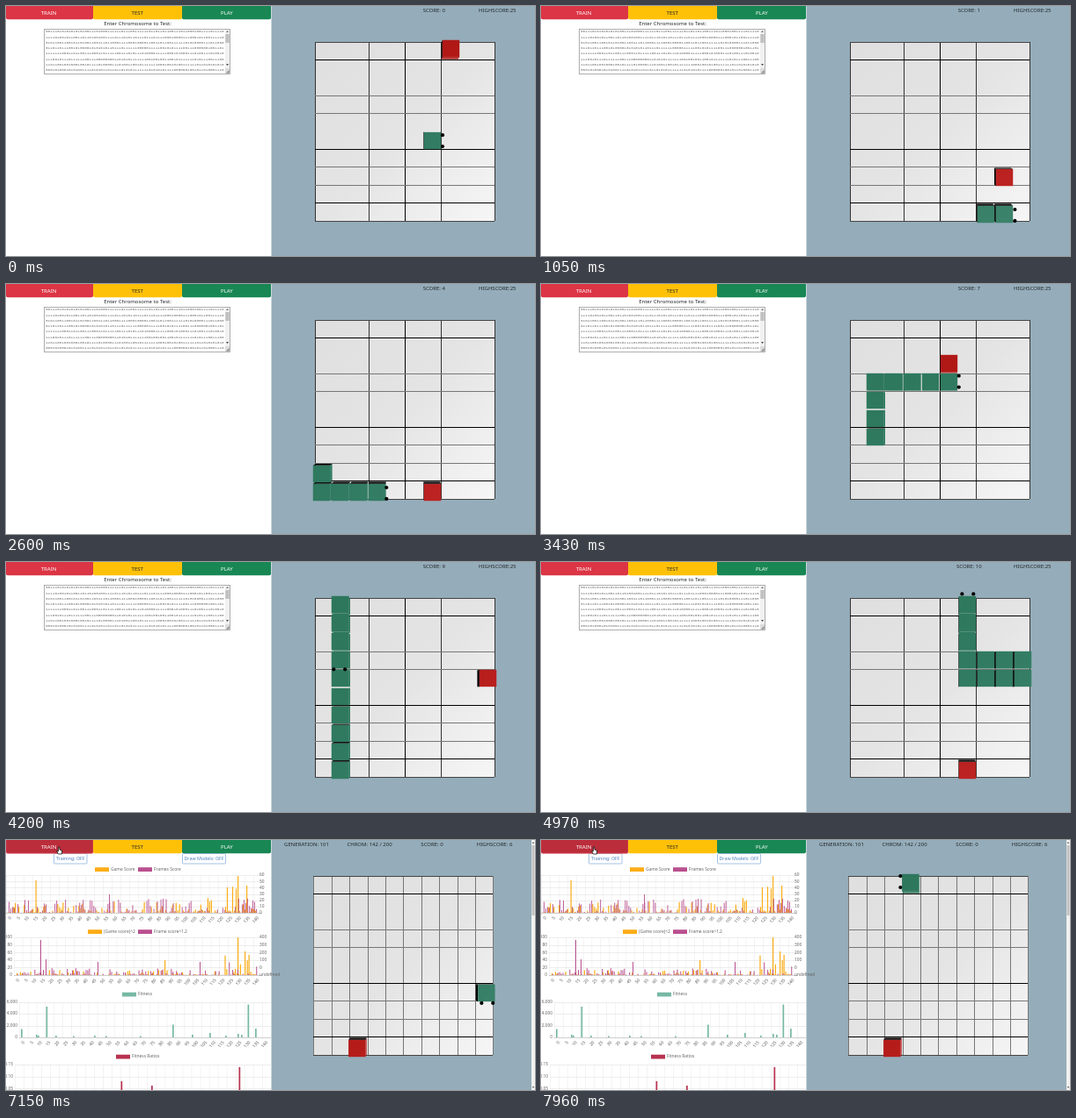
An HTML page with a canvas for the animation above (8 s loop, 601x285 px).

```html
<!DOCTYPE html>
<html lang="en">
<head>
<meta charset="utf-8">
<title>Snake trainer</title>
<style>
html, body { margin: 0; width: 100%; height: 100%; overflow: hidden; background: #fff; }
canvas { display: block; }
</style>
</head>
<body>
<canvas id="stage" width="601" height="285"></canvas>
<script>
const ctx = document.getElementById('stage').getContext('2d');
const LOOP = 8000, TICK = 69.82, SWITCH = 98;
const SANS = '"Noto Sans", "Open Sans", sans-serif', MONO = '"Liberation Mono", monospace';
const CELL = 20.4, MID = { x: 453, y: 143 };
const DIRS = { R: [1, 0], L: [-1, 0], U: [0, -1], D: [0, 1] };

function boardShade(...colors) {
  const g = ctx.createLinearGradient(351, 41, 555, 245);
  colors.forEach((c, i) => g.addColorStop(i / (colors.length - 1), c));
  return g;
}

const FLOOR = boardShade('#dfdfdf', '#e5e4e4', '#f6f6f6');
const GREEN = boardShade('#2d765b', '#2f7a60', '#3d846d');
const RED = boardShade('#ae1614', '#b11917', '#c12827');

function seeded(seed) {
  return () => {
    seed = (seed * 1664525 + 1013904223) >>> 0;
    return seed / 4294967296;
  };
}

function rect(x, y, w, h, color) {
  ctx.fillStyle = color;
  ctx.fillRect(x, y, w, h);
}

function shape(points, fill, stroke) {
  ctx.beginPath();
  points.forEach(([x, y], i) => i ? ctx.lineTo(x, y) : ctx.moveTo(x, y));
  ctx.closePath();
  ctx.fillStyle = fill;
  ctx.fill();
  if (stroke) {
    ctx.strokeStyle = stroke;
    ctx.lineWidth = 0.8;
    ctx.stroke();
  }
}

function label(str, x, y, color = '#212529', size = 6, align = 'center', family = SANS) {
  ctx.font = size + 'px ' + family;
  ctx.textAlign = align;
  ctx.textBaseline = 'middle';
  ctx.fillStyle = color;
  ctx.fillText(str, x, y);
}

// A game expands a route such as "R3U2" into head positions and meals.
function makeGame(route, foods) {
  const heads = [{ x: 6, y: 5, d: DIRS.R }];
  const meals = [];
  for (const [, dir, count] of route.matchAll(/([RLUD])(\d+)/g)) {
    for (let i = 0; i < +count; i++) {
      const last = heads[heads.length - 1], d = DIRS[dir];
      const head = { x: (last.x + d[0] + 10) % 10, y: (last.y + d[1] + 10) % 10, d };
      heads.push(head);
      const food = foods[meals.length];
      if (food && food[0] === head.x && food[1] === head.y) meals.push(heads.length - 1);
    }
  }
  return { heads, meals, foods };
}

const testGame = makeGame(
  'R1U5L3D9R5U3L1D1L1U7L7D9R11U6R4U1L4D12R8U1L3U5L6D1R9U9L6D6R4',
  [[7, 0], [8, 7], [7, 1], [0, 3], [6, 9], [1, 6], [3, 3], [5, 2],
   [1, 8], [9, 4], [6, 9], [2, 8], [9, 1], [3, 4], [8, 6]]);
const trainGame = makeGame('R2U1R1D5L2U9L4', [[2, 9]]);

// Pace of play: tick and number of moves made by then.
const PACE = [[0, 0], [15, 22], [37, 55], [49, 73], [71, 105], [86, 129], [98, 148]];

function movesAt(tick) {
  for (let i = 1; i < PACE.length; i++) {
    const [a, m] = PACE[i - 1], [b, n] = PACE[i];
    if (tick <= b) return Math.floor(m + (n - m) * (tick - a) / (b - a) + 0.01);
  }
  return 148;
}

// Seen from above: raised points move away from the middle of the board.
function raise(x, y, zoom) {
  return [MID.x + (x - MID.x) * zoom, MID.y + (y - MID.y) * zoom];
}

function cube(col, row, color, topPass) {
  const x = 351 + (col + 0.5) * CELL, y = 41 + (row + 0.5) * CELL, half = 9.4;
  const L = x - half, R = x + half, T = y - half, B = y + half;
  const [l, t] = raise(L, T, 1.03), [r, b] = raise(R, B, 1.03);
  if (topPass) return rect(l, t, r - l, b - t, color);
  if (b < B) shape([[L, B], [R, B], [r, b], [l, b]], color);
  if (r < R) shape([[R, T], [R, B], [r, b], [r, t]], color);
  if (l > L) shape([[L, T], [l, t], [l, b], [L, B]], '#000');
  if (t > T) shape([[L, T], [R, T], [r, t], [l, t]], '#000');
}

function drawBoard(training, shift) {
  const x0 = 351 + shift, size = CELL * 10;
  rect(x0, 41, size, size, FLOOR);
  const columns = training ? [0, 1, 2, 3, 4, 5, 6, 7, 8, 9, 10] : [0, 3, 5, 7, 10];
  for (const i of columns) {
    const color = training ? '#777' : i === 5 ? '#000' : '#333';
    rect(Math.round(x0 + i * CELL), 41, 1, size, color);
  }
  for (const i of [0, 1, 3, 4, 6, 7, 8, 9, 10]) {
    const color = [1, 6, 9].includes(i) ? '#000' : i % 10 ? '#777' : '#444';
    rect(Math.round(x0), Math.floor(41 + i * CELL), Math.round(size), 1, color);
  }
}

function drawGame(game, n, shift) {
  n = Math.min(n, game.heads.length - 1);
  const score = game.meals.filter(m => m <= n).length;
  const head = game.heads[n];
  const parts = game.heads.slice(Math.max(0, n - score), n + 1).map(p => [p.x, p.y, GREEN]);
  const food = game.foods[score];
  if (food) parts.push([...food, RED]);
  ctx.save();
  ctx.translate(shift, 0);
  for (const top of [false, true]) {
    for (const [x, y, color] of parts) cube(x, y, color, top);
  }
  const [dx, dy] = head.d;
  for (const side of [-6.2, 6.2]) {
    const ex = 351 + (head.x + 0.5) * CELL + dx * 10.7 + dy * side;
    const ey = 41 + (head.y + 0.5) * CELL + dy * 10.7 + dx * side;
    ctx.beginPath();
    ctx.arc(...raise(ex, ey, 1.04), 2.1, 0, Math.PI * 2);
    ctx.fillStyle = '#000';
    ctx.fill();
  }
  ctx.restore();
  return score;
}

function drawButtons(hover, focus) {
  const tabs = [['TRAIN', 0, 99, '#dc3545', '#fff', '#bb2d3b'],
                ['TEST', 99, 101, '#ffc107', '#212529', '#ffca2c'],
                ['PLAY', 200, 101, '#198754', '#fff', '#157347']];
  tabs.forEach(([name, x, w, color, ink, dark], i) => {
    ctx.beginPath();
    ctx.roundRect(x, -3, w, 18.2, 2);
    ctx.fillStyle = hover === i ? dark : color;
    ctx.fill();
    if (focus === i) {
      ctx.strokeStyle = 'rgba(225, 83, 97, 0.5)';
      ctx.lineWidth = 1.4;
      ctx.stroke();
    }
    label(name, x + w / 2 - 1 + i * 0.7, 8.3, ink, 6);
  });
}

const bitRandom = seeded(77);
const bitRows = Array.from({ length: 8 }, () =>
  Array.from({ length: 78 }, () => bitRandom() < 0.5 ? 0 : 1).join(''));

function drawTestPage() {
  label('Enter Chromosome to Test:', 149.5, 20.3);
  ctx.strokeStyle = '#999';
  ctx.lineWidth = 0.8;
  ctx.strokeRect(43.5, 26.5, 211, 51);
  ctx.save();
  ctx.beginPath();
  ctx.rect(44, 27, 210, 50);
  ctx.clip();
  bitRows.forEach((row, i) => label(row, 45, 29.2 + i * 6.28, '#6a6a6a', 4.33, 'left', MONO));
  rect(249, 27, 5, 50, '#f1f1f1');
  rect(249.3, 32, 4.4, 10, '#c1c1c1');
  shape([[250, 30], [253, 30], [251.5, 28]], '#777');
  shape([[250, 66], [253, 66], [251.5, 68]], '#444');
  rect(249, 71, 5, 6, '#dcdcdc');
  shape([[253.5, 73], [253.5, 76.5], [250, 76.5]], '#888');
  ctx.restore();
}

const ORANGE = '#fbad17', PURPLE = '#b9508f', TEAL = '#77b8a4', CRIMSON = '#b8324f';

function axes(x0, x1, top, bottom, left, right) {
  const rows = (left || right).length - 1;
  const h = bottom - top, step = (x1 - x0) / 29;
  for (let i = 0; i < 29; i++) {
    const x = x0 + i * step;
    rect(x, top, 0.6, h + 2, '#ececec');
    if (bottom > 285) continue;
    ctx.save();
    ctx.translate(x + 4, bottom + 6.5);
    ctx.rotate(-0.85);
    label(i * 5, 2, 0, '#555', 4.8, 'right');
    ctx.restore();
  }
  for (let i = 0; i <= rows; i++) {
    rect(x0, Math.round(top + h * i / rows), x1 - x0, 0.7, i === rows ? '#bbb' : '#e6e6e6');
    if (right) label(right[i], x1 - 3, top + h * i / rows, '#666', 4.8, 'left');
  }
  if (left) left.forEach((s, i) => label(s, x0 - 2, top + h * i / (left.length - 1), '#666', 4.8, 'right'));
}

function legend(x, y, color, text) {
  rect(x, y - 2.3, 16, 4.8, color);
  label(text, x + 18, y, '#666', 4.9, 'left');
}

function bars(base, color, list, w) {
  for (const [x, h] of list) rect(x, base - h, w, h, color);
}

// Sparse noisy series of [x, height]; level(u) bounds the height at u in 0..1.
function noise(seed, x0, x1, level) {
  const rnd = seeded(seed);
  return Array.from({ length: 142 }, (_, i) =>
    [x0 + (x1 - x0) * i / 145, level(i / 142) * Math.pow(rnd(), 3.2)]);
}

const gameBars = noise(11, 0, 291, u => u > 0.8 ? 38 : u < 0.16 ? 19 : 13).concat([[33.5, 37], [263, 42], [273, 31]]);
const frameBars = noise(29, 1, 292, u => u > 0.8 ? 20 : 17).concat([[117, 21], [178, 16]]);
const squareBars = noise(5, 10, 291, u => u > 0.86 ? 28 : 6).concat([[180, 17], [263, 43], [271, 27]]);
const powerBars = noise(47, 11, 292, u => u > 0.86 ? 18 : 8).concat([[39, 40], [45, 18], [104, 15], [220, 15]]);
const fitBars = [[17, 9.5], [34, 3], [36, 2], [45.5, 35], [56, 2], [76, 1.5], [100, 2], [113, 1.5],
  [152, 1.5], [189, 14.5], [211, 3], [231, 5], [249, 2], [263, 4], [267, 3], [274.5, 37.5], [283, 10]];

function drawTrainPage() {
  for (const [text, x, w] of [['Training: OFF', 54.5, 37.5], ['Draw Models: OFF', 200.5, 49]]) {
    ctx.strokeStyle = '#7fa9dc';
    ctx.lineWidth = 0.7;
    ctx.beginPath();
    ctx.roundRect(x, 15.5, w, 11.5, 1);
    ctx.stroke();
    label(text, x + w / 2, 21.5, '#4d7fbd', 5.3);
  }
  legend(101, 33.5, ORANGE, 'Game Score');
  legend(150, 33.5, PURPLE, 'Frames Score');
  axes(0, 291, 40, 83, null, [60, 50, 40, 30, 20, 10, 0]);
  bars(83, ORANGE, gameBars, 1.2);
  bars(83, PURPLE, frameBars, 0.9);

  legend(93, 104.5, ORANGE, '(Game score)^2');
  legend(150, 104.5, PURPLE, 'Frame score^1.2');
  axes(9, 291, 111, 154, ['100', '80', '60', '40', '20', '0'], [400, 300, 200, 100, 0]);
  bars(154, ORANGE, squareBars, 1.2);
  bars(154, PURPLE, powerBars, 1);

  legend(132, 176, TEAL, 'Fitness');
  axes(15, 301, 184.5, 225, ['6,000', '4,000', '2,000', '0'], null);
  bars(225, TEAL, fitBars, 1.7);

  legend(125, 247, CRIMSON, 'Fitness Ratios');
  axes(10, 301, 256, 297, ['0.15', '0.10', '0.05', '0'], null);
  bars(297, CRIMSON, [[130.5, 22], [165, 17], [264.5, 38]], 1.7);
}

function drawCursor(tick) {
  if (tick < 85) return;
  const u = Math.min(1, Math.max(0, (tick - 86) / 11));
  const s = u * u * (3 - 2 * u);
  const x = 531.5 + (60 - 531.5) * s, y = 277 + (8 - 277) * s;
  const at = pts => pts.map(([a, b]) => [x + a, y + b]);
  if (y < 15) {
    shape(at([[-0.6, 0], [0.8, 0], [0.9, 3], [3.6, 4], [3.4, 8], [-0.6, 8], [-2.5, 4.6], [-0.6, 5]]), '#fff', '#111');
  } else {
    shape(at([[0, 0], [0, 6], [1.4, 4.8], [2.4, 6.6], [3.2, 6.1], [2.4, 4.4], [4, 4.2]]), '#fff', '#111');
  }
}

function draw(time) {
  const tick = Math.floor(time / TICK);
  const training = tick >= SWITCH;
  const shift = training ? -1.7 : 0;
  rect(0, 0, 601, 285, '#fff');
  rect(301.5, 0, 299.5, 285, '#95adba');
  if (training) drawTrainPage();
  else drawTestPage();
  drawButtons(tick >= 95 ? 0 : -1, training ? 0 : -1);
  drawBoard(training, shift);
  if (training) {
    const score = drawGame(trainGame, Math.floor((tick - SWITCH) * 1.5), shift);
    label('GENERATION: 101', 341.5, 5.4);
    label('CHROM: 142 / 200', 413, 5.4);
    label('SCORE: ' + score, 484, 5.4);
    label('HIGHSCORE: 6', 555, 5.4);
    rect(597, 0, 4, 285, '#f1f1f1');
    rect(597.5, 6, 3, 80, '#c1c1c1');
    shape([[597.7, 4], [600.3, 4], [599, 2]], '#666');
    shape([[597.7, 281], [600.3, 281], [599, 283]], '#666');
  } else {
    const score = drawGame(testGame, movesAt(tick), shift);
    label('SCORE: ' + score, 486.3, 5.4);
    label('HIGHSCORE:25', 558.3, 5.4);
  }
  drawCursor(tick);
}

const start = performance.now();
function frame() {
  draw((performance.now() - start) % LOOP);
  requestAnimationFrame(frame);
}
frame();
</script>
</body>
</html>
```
